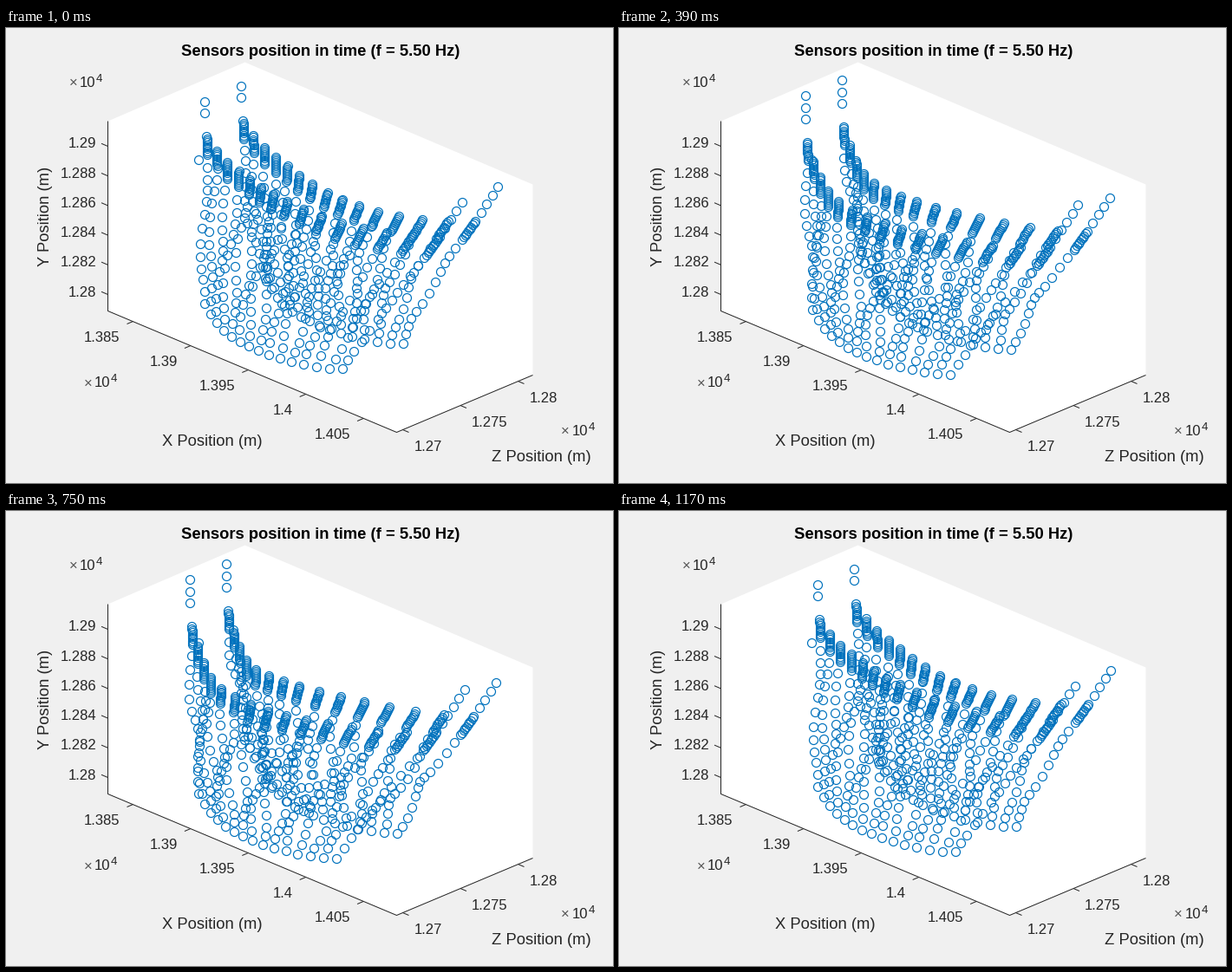
Animation, 700 px wide and 525 px high, one loop 1.2 s. Source, as a matplotlib script:

```python
import numpy as np
import matplotlib.pyplot as plt
from matplotlib.animation import FuncAnimation
from matplotlib.patches import Polygon

W, H, DPI = 700, 525, 100
FRAMES, INTERVAL = 40, 30
PX = 72 / DPI
BLUE, GREY = "#0072BD", "#262626"

plt.rcParams["font.family"] = "Liberation Sans"
fig = plt.figure(figsize=(W / DPI, H / DPI), dpi=DPI, facecolor="#F0F0F0")
ax = fig.add_axes([0, 0, 1, 1])
ax.set_xlim(-0.5, W - 0.5)
ax.set_ylim(H - 0.5, -0.5)
ax.axis("off")


def label(x, y, text, size=16.67, color=GREY, **kw):
    ax.text(x, y, text, fontsize=size * PX, color=color, va="baseline", **kw)


def line(*pts):
    ax.plot(*zip(*pts), color=GREY, lw=PX, solid_capstyle="butt")


def exponent(x, y):
    label(x, y, "×", color="#555555")
    label(x + 12.5, y, "10")
    label(x + 31.5, y - 6, "4", size=13.3)


def ticks(values, start, step, tick, offset, **kw):
    for i, value in enumerate(values):
        x, y = start[0] + step[0] * i, start[1] + step[1] * i
        line((x, y), (x + tick[0], y + tick[1]))
        label(x + offset[0], y + offset[1], f"{value:.5g}", **kw)


def draw_axes():
    box = [(117, 107), (275, 39), (607, 180), (607, 400), (450, 466), (117, 326)]
    ax.add_patch(Polygon(box, closed=True, fc="white", ec="none"))
    line((117, 107), (117, 326), (450, 466), (607, 400))

    ticks(np.linspace(1.29, 1.28, 6), (117, 136), (0, 34.2),
          (-7.5, -3.2), (-13.5, 2), ha="right")
    ticks(np.linspace(1.385, 1.405, 5), (146, 338), (66.4, 28),
          (-7, 3), (-15, 24), ha="right")
    ticks(np.linspace(1.27, 1.28, 3), (457, 463), (66.5, -28),
          (7, 3), (13, 25))

    exponent(72, 67)
    exponent(89, 414)
    exponent(639.5, 469)
    label(362.5, 31, "Sensors position in time (f = 5.50 Hz)", size=18.33,
          color="black", ha="center", weight="bold")
    label(237.5, 481, "X Position (m)", size=18.33, ha="center")
    label(616.5, 499, "Z Position (m)", size=18.33, ha="center")
    label(50, 217, "Y Position (m)", size=18.33, ha="center",
          rotation=90, rotation_mode="anchor")


COLS, DENSE, ROWS = 15, 10, 12
U = np.linspace(0, 1, COLS)
KNOTS = np.linspace(0, 1, 5)


def smooth(xs, ys):
    """Smooth curve through five evenly spaced key points."""
    return np.column_stack([np.polyval(np.polyfit(KNOTS, k, 4), U) for k in (xs, ys)])


def blend(xs, ys):
    """Straight blend between five evenly spaced key values."""
    return np.column_stack([np.interp(U, KNOTS, k) for k in (xs, ys)])


# Near face of the wall, and the depth offset that leads to the far face.
CREST = smooth([224, 261, 315, 393, 498], [128, 181, 212, 235.5, 246])
BASE = smooth([226, 252, 288, 333, 385], [321, 355, 375, 389, 396])
CREST_GAP, BASE_GAP = np.array([42, -18]), np.array([70, -29])

# Sway of the crest, near face then far face, and of the base.
SWAY = [blend([10, 20.5, 13, 9, 2], [-4.7, -17.5, -18, -11, -8.5]),
        blend([10, 21.5, 19, 7.5, 1], [-4.7, -15, -7, -4.5, -8.5])]
BASE_SWAY = np.array([4, -4.5])
POSE = np.cos(2 * np.pi * 8 / FRAMES)  # phase at which the key points hold


def build():
    pos, amp, depth = [], [], []

    def add(p, sway, face):
        pos.append(p - POSE * sway)
        amp.append(sway)
        depth.append(face)

    for face in (0, 1):
        crest, base = CREST + face * CREST_GAP, BASE + face * BASE_GAP
        for j, u in enumerate(U):
            sway = SWAY[face][j]
            lean = np.array([1 - 16 * u ** 1.6, 21 - 16 * u * (1 - u)])
            for k in np.linspace(0, 1, DENSE):
                add(crest[j] + lean * k, sway, face)

            start = crest[j] + lean
            for v in np.arange(1, ROWS + 1) / ROWS:
                bow = np.array([(12 + 16 * face) * v * (1 - v), 0])
                ripple = 6 * np.sin(np.pi * v) * np.array(
                    [np.sin(2.1 * j + 7 * v + face),
                     np.cos(1.7 * j + 9 * v + 2 * face)])
                add(start + (base[j] - start) * v - bow,
                    sway * (1 - v) + BASE_SWAY * v + ripple, face)

        # The outer columns rise above the crest.
        for k in range(2, 5):
            add(crest[0] + (-2, -13.5 * k), SWAY[face][0], face)
        for k in range(1, 6 - face):
            add(crest[-1] + np.array([6.5, -9.8]) * k, SWAY[face][-1], face)

    add(np.array([221.5, 151.5]), np.zeros(2), 0)  # fixed sensor
    return np.array(pos), np.array(amp), np.array(depth)


draw_axes()
pos, amp, depth = build()
dots, = ax.plot([], [], "o", ms=10 * PX, mfc="none", mec=BLUE, mew=1.2 * PX)


def update(i):
    x, y = (pos + np.cos(2 * np.pi * i / FRAMES) * amp).T
    # Points above the top of the axes box are cut off.
    ceiling = 73.2 + 0.42 * (x - 222) - 35.6 * depth
    shown = y >= ceiling
    dots.set_data(x[shown], y[shown])
    return dots,


anim = FuncAnimation(fig, update, frames=FRAMES, interval=INTERVAL,
                     repeat=True, repeat_delay=0, blit=False)
plt.show()
```
